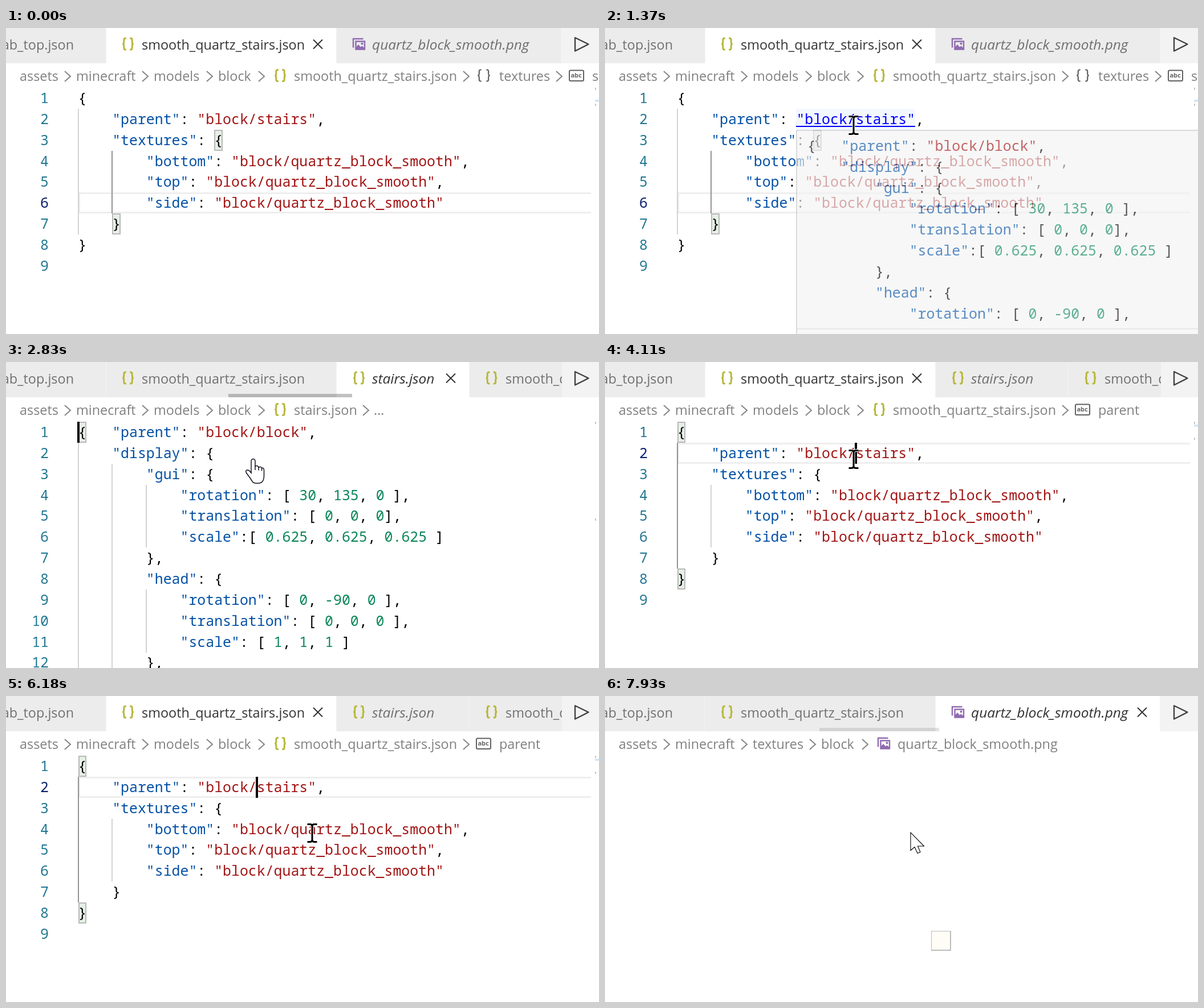
An HTML page that plays this animation: 1040x538 px, repeating every 8000 ms.

```html
<!DOCTYPE html>
<html lang="en">
<head>
<meta charset="utf-8">
<title>Following links in JSON models</title>
<style>
html, body { margin: 0; width: 100%; height: 100%; overflow: hidden; background: #fff; }
svg { display: block; width: 1040px; height: 538px; }
text { white-space: pre; }
rect:not([rx]) { shape-rendering: crispEdges; }
.code { font: 24.87px "Noto Sans Mono", monospace; }
.ui { font: 23.4px "Open Sans", sans-serif; }
.it { font: italic 24.5px "Open Sans", sans-serif; }
</style>
</head>
<body>
<svg id="stage" viewBox="0 0 1040 538"></svg>
<script>
const LOOP = 8000, ROW = 36.85, COL = 14.92, LEFT = 126.5, TOP = 105.2;
const stage = document.getElementById('stage');

const MODEL = [
  '{',
  '    "parent": "block/stairs",',
  '    "textures": {',
  '        "bottom": "block/quartz_block_smooth",',
  '        "top": "block/quartz_block_smooth",',
  '        "side": "block/quartz_block_smooth"',
  '    }',
  '}',
  ''
];
const STAIRS = [
  '{   "parent": "block/block",',
  '    "display": {',
  '        "gui": {',
  '            "rotation": [ 30, 135, 0 ],',
  '            "translation": [ 0, 0, 0],',
  '            "scale":[ 0.625, 0.625, 0.625 ]',
  '        },',
  '        "head": {',
  '            "rotation": [ 0, -90, 0 ],',
  '            "translation": [ 0, 0, 0 ],',
  '            "scale": [ 1, 1, 1 ]',
  '        },'
];

// pointer keys: time, x, y
const PATH = [
  [420, 925, 10], [560, 795, 72], [700, 650, 135], [840, 545, 184],
  [980, 475, 180], [1120, 440, 173], [1190, 436, 171], [4460, 436, 171],
  [4600, 402, 156], [4740, 382, 240], [4880, 420, 333], [5060, 500, 250],
  [5200, 537, 194], [5270, 537, 197], [5340, 600, 215], [5480, 770, 232],
  [5620, 560, 238], [5690, 422, 238], [5760, 530, 227], [5970, 530, 227],
  [6040, 532, 231], [6110, 535, 237], [6180, 537, 241], [LOOP, 537, 241]
];

const rect = (x, y, w, h, fill, more = '') =>
  `<rect x="${x}" y="${y}" width="${w}" height="${h}" fill="${fill}" ${more}/>`;
const line = (d, color, width, more = '') =>
  `<path d="${d}" fill="none" stroke="${color}" stroke-width="${width}" ${more}/>`;
const label = (x, y, s, color, cls = 'ui', more = '') =>
  `<text class="${cls}" x="${x}" y="${y}" fill="${color}" ${more}>${s}</text>`;
const at = (x, y, body) => `<g transform="translate(${x} ${y})">${body}</g>`;
const rowY = n => TOP + (n - 1) * ROW;
const colX = c => LEFT + c * COL;

function braces(x, y, color, width, gap) {
  const one = line(`M${-gap} -10h-1.500q-2.500 0 -2.500 3v3.500q0 3.500 -2.500 3.500` +
    'q2.500 0 2.500 3.500v3.500q0 3 2.500 3h1.500', color, width);
  return at(x, y, one + `<g transform="scale(-1 1)">${one}</g>`);
}
const json = (x, y) => braces(x, y, '#b7b73b', 3, 3.2);
const picture = (x, y) => at(x, y,
  line('M-10 6V-9.500H7.500', '#8f6bb0', 2.4) +
  line('M-5.500 -5H10V9H-5.500Z', '#8f6bb0', 2.4) +
  '<path d="M-5 8.500V5L-1 0.500L3 5L5.500 3L10 7V8.500Z" fill="#8f6bb0"/>' +
  '<circle cx="5.500" cy="-1" r="2" fill="#8f6bb0"/>');
const cross = x => line(`M${x - 8} 20.500l16 16m0 -16l-16 16`, '#333', 2);
const chevron = x => line(`M${x} 76l10 9l-10 9`, '#858585', 2);
const abc = x => rect(x + 1, 74.5, 25, 18.5, 'none', 'rx="2" stroke="#616161" stroke-width="2"') +
  `<text x="${x + 13.5}" y="87" text-anchor="middle" fill="#616161" font-family="Noto Sans Mono, monospace" font-size="11" font-weight="700">abc</text>`;

function code(s, x, y) {
  const spans = s.replace(/("[^"]*")(\s*:)?|-?\d[\d.]*/g, (m, str, colon) =>
    !str ? `<tspan fill="#098658">${m}</tspan>`
      : `<tspan fill="${colon ? '#0451a5' : '#a31515'}">${str}</tspan>${colon || ''}`);
  return label(x, y, spans, '#000', 'code');
}

function tabs(view, t) {
  let s = rect(0, 0, 1040, 62, '#f3f3f3');
  const tab = (x, w, on) => rect(x, 0, w, 62, on ? '#fff' : '#ececec');
  const tone = on => on ? '#333' : '#707070';
  const model = view === 'model', replaced = t >= 2620 && t < 7040;
  s += tab(0, 175, false) + label(119, 38, 'slab_top.json', '#707070', 'ui', 'text-anchor="end"');
  s += tab(176, 403, model) + json(214, 28) +
    label(238, 38, 'smooth_quartz_stairs.json', tone(model));
  if (model) s += cross(547);
  if (replaced) {
    const on = view === 'stairs';
    s += tab(580, 232, on) + json(619, 28) + label(642, 38, 'stairs.json', tone(on), 'it');
    if (on) s += cross(780);
    s += tab(813, 162, false) + json(851.5, 28) + label(876, 38, 'smooth_quartz', '#707070');
  } else {
    const on = view === 'png';
    s += tab(580, 393, on) + picture(619, 28.5) +
      label(642, 38, 'quartz_block_smooth.png', tone(on), 'it');
    if (on) s += cross(942);
  }
  s += rect(replaced ? 975 : 973, 0, 67, 62, '#f3f3f3');
  s += line('M998 17V40.500L1021.500 28.500Z', '#424242', 2.4, 'stroke-linejoin="round"');
  if (view === 'stairs')
    s += rect(390, 56, 217, 6, '#646464', `opacity="${Math.min(1, (t - 2550) / 210) * .4}"`);
  if (view === 'png') s += rect(376, 56, 210, 6, '#646464', 'opacity=".19"');
  return s;
}

function crumbs(view, leaf) {
  const word = (x, s) => label(x, 93, s, '#808080');
  let s = word(24, 'assets') + chevron(103) + word(123, 'minecraft') + chevron(239);
  if (view === 'png')
    return s + word(259, 'textures') + chevron(359) + word(379, 'block') + chevron(451) +
      picture(489, 83.5) + word(513, 'quartz_block_smooth.png');
  s += word(259, 'models') + chevron(352) + word(372, 'block') + chevron(443) + json(481, 83.5);
  if (view === 'stairs') return s + word(505, 'stairs.json') + chevron(626) + word(645, '…');
  s += word(505, 'smooth_quartz_stairs.json') + chevron(802);
  if (leaf === 'parent') return s + abc(824) + word(865, leaf);
  return s + braces(838, 83.5, '#616161', 2.2, 4.2) + word(865, 'textures') + chevron(965) +
    abc(987) + word(1028, leaf);
}

const guide = (col, from, to, dark) =>
  rect(colX(col) - 1, rowY(from), 2, (to - from + 1) * ROW, dark ? '#939393' : '#d3d3d3');
const match = (row, col) => rect(colX(col) + 1, rowY(row) + 1, 12.5, ROW - 2,
  '#e6f0e6', 'stroke="#b9b9b9" stroke-width="2"');
const caret = (row, col) => rect(colX(col) - 2, rowY(row), 4, ROW, '#000');
const link = (row, col, len, s) =>
  label(colX(col), rowY(row) + 26.8, s, '#00f', 'code') +
  rect(colX(col), rowY(row) + 30, len * COL, 2, '#00f');

function lines(rows, active) {
  return rows.map((s, i) => {
    const y = rowY(i + 1) + 26.8;
    return label(75, y, i + 1, i + 1 === active ? '#0b216f' : '#237893', 'code', 'text-anchor="end"') +
      code(s, LEFT, y);
  }).join('');
}

const ticks = end => rect(1033, 105, 2, 4, '#c4c4c4') + rect(1033, end, 2, 4, '#c4c4c4');

function modelView(t) {
  const active = t < 2480 ? 6 : t < 6820 ? 2 : 4;
  const outer = t >= 2550 && t < 6820;
  const inner = active !== 2;
  let s = rect(LEFT + 1.5, rowY(active) + 1.5, 904, ROW - 3, 'none', 'stroke="#eee" stroke-width="3"') +
    rect(1026, rowY(active) - 1, 8, ROW + 2, '#fff');
  if (t >= 1190 && t < 2480) s += rect(335, rowY(2), 14 * COL, ROW, '#f3f8fe');
  s += guide(0, 2, 7, !inner) + guide(4, 4, 6, inner);
  s += outer ? match(1, 0) + match(8, 0) : match(3, 16) + match(7, 4);
  s += rect(1033, 102 + 4 * active, 7, 4, '#d3e8fa') + ticks(133);

  const linked = t >= 1120 && t < 2620 ? 2 : t >= 6710 && t < 6960 ? 4 : 0;
  const shown = MODEL.map((row, i) => i + 1 === linked ? row.replace(/ "block[^"]*"/, m => ' '.repeat(m.length)) : row);
  s += lines(shown, active);
  if (linked === 2) s += link(2, 14, 14, '"block/stairs"');
  if (linked === 4) s += link(4, 18, 27, '"block/quartz_block_smooth"');

  const blink = Math.floor((t - 4110) / 492) % 2 === 0;
  if (t >= 6820) s += caret(4, 27);
  else if (t >= 4110 ? blink : t >= 2480) s += caret(2, 21);
  if (t >= 1300 && t < 2480) s += popup(t < 1370 ? .2 : t < 1440 ? .66 : 1);
  return s;
}

function popup(alpha) {
  const rows = STAIRS.slice(0, 9).map((s, i) => code(s, 354.7, 215.8 + i * ROW)).join('');
  return `<g opacity="${alpha}">` +
    rect(336, 180, 760, 400, '#f3f3f3', 'stroke="#c8c8c8" stroke-width="2"') +
    rows + rect(337, 528, 703, 2, '#dcdcdc') + '</g>';
}

function stairsView(t) {
  let s = guide(0, 2, 12) + guide(4, 3, 12) + guide(8, 4, 6) + guide(8, 9, 11) +
    match(1, 0) + lines(STAIRS, 0) + ticks(275);
  if (t < 3270 || t >= 3760) s += caret(1, 0);
  return s;
}

const SHAPES = {
  beam: ['#fff', '#000'].map((c, i) => line('M-8.500 -15.500H-4Q0 -15.500 0 -12V12Q0 15.500 -4 15.500H-8.500' +
    'M8.500 -15.500H4Q0 -15.500 0 -12V12Q0 15.500 4 15.500H8.500', c, i ? 3 : 5)).join(''),
  arrow: '<path d="M-1 -1V30.500L6 24.500L11 35.500L16 33.500L11.500 23H22.500Z" fill="#fff" stroke="#000" stroke-width="1.1"/>',
  hand: '<path d="M-6 3a3.500 3.500 0 0 1 7 0V12q5 -1.500 6 2q5 -1.500 5.500 1.500q4 -1 4 4V29' +
    'q0 9 -5 12q-6 2.500 -14 0q-3 -4 -6 -9l-6 -8q-2 -4 1 -5q4 -.5 7.500 5Z" fill="#fff" stroke="#112" stroke-width="1.5"/>' +
    line('M1 11v8M7 13.500v6M12.500 15.500v5', '#112', 1.5)
};

function pointer(t) {
  if (t < 420) return '';
  const k = PATH.findIndex((p, i) => i + 1 < PATH.length && t < PATH[i + 1][0]);
  const [t0, x0, y0] = PATH[k], [t1, x1, y1] = PATH[k + 1];
  const f = Math.floor((t - t0) / 70) * 70 / (t1 - t0);
  const x = x0 + (x1 - x0) * f, y = y0 + (y1 - y0) * f;
  const hand = t >= 2010 && t < 4110 || t >= 6710 && t < 6960;
  return at(x, y, SHAPES[hand ? 'hand' : y < TOP || t >= 6960 ? 'arrow' : 'beam']);
}

function draw(t) {
  const view = t >= 7040 ? 'png' : t >= 2620 && t < 4110 ? 'stairs' : 'model';
  const leaf = t < 2550 ? 'side' : t < 6820 ? 'parent' : 'bottom';
  let s = rect(0, 0, 1040, 538, '#fff') + tabs(view, t) + crumbs(view, leaf);
  if (view === 'model') s += modelView(t);
  else if (view === 'stairs') s += stairsView(t);
  else if (t >= 7370) s += rect(572.5, 413.5, 33.5, 33.5, '#fffdf6', 'stroke="#bcbcbc" stroke-width="1.5"');
  return s + pointer(t);
}

let last = '';
const start = performance.now();
function frame() {
  const s = draw((performance.now() - start) % LOOP);
  if (s !== last) stage.innerHTML = last = s;
  requestAnimationFrame(frame);
}
frame();
</script>
</body>
</html>
```
